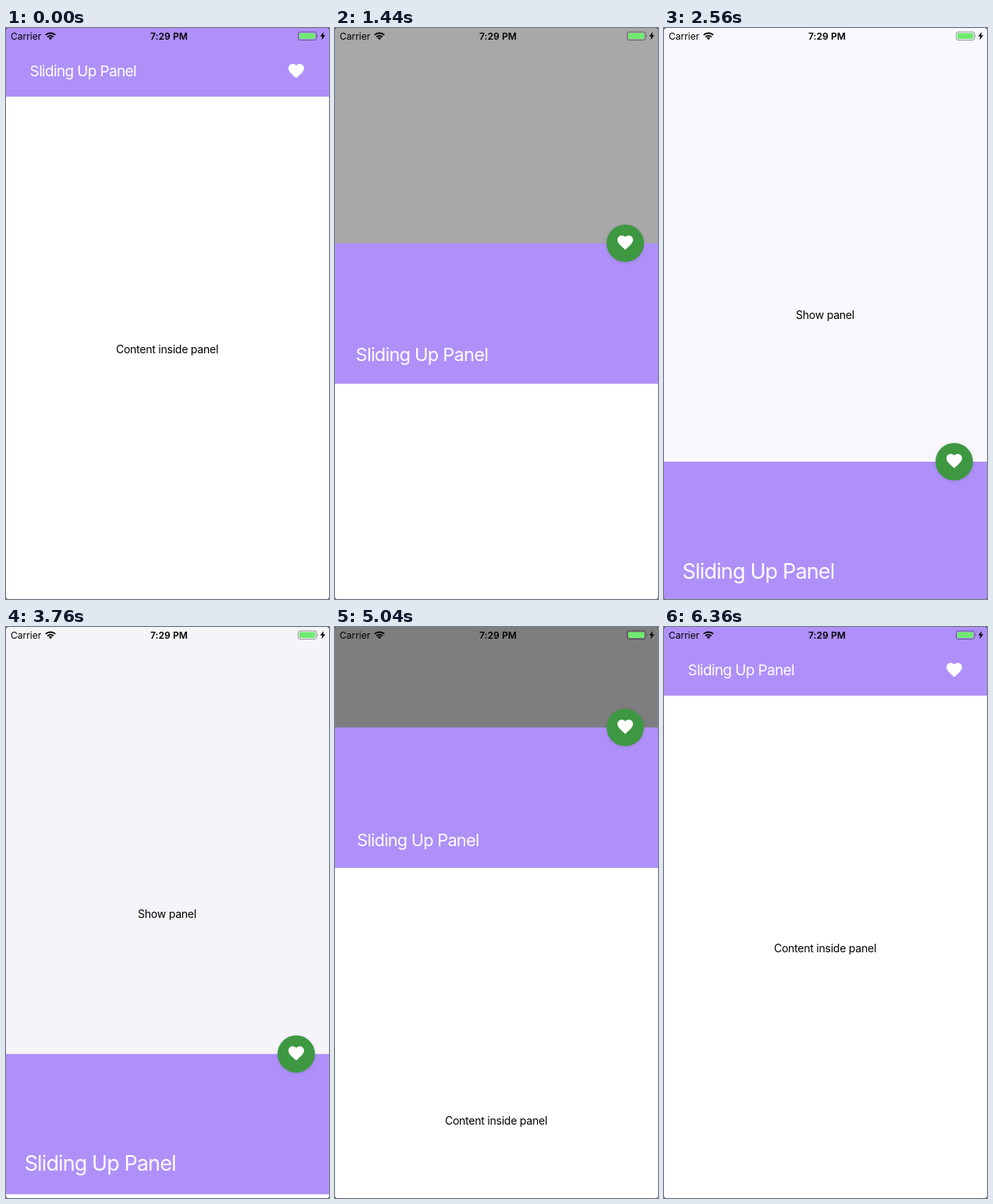
Animation of 414 by 732 pixels, one loop 6480 ms. Source, as an HTML page:

```html
<!DOCTYPE html>
<html lang="en">
<head>
<meta charset="utf-8">
<title>Sliding Up Panel</title>
<style>
  html, body { margin: 0; width: 100%; height: 100%; overflow: hidden; background: #222; }
  svg { display: block; width: 414px; height: 732px; border-radius: 3px; background: #f8f7fc; }
  text { font: 14px Inter, "Liberation Sans", sans-serif; letter-spacing: -.23px; }
  .mid { text-anchor: middle; }
  #title { font-size: 27px; letter-spacing: -.85px; fill: #fff; }
  #disc { filter: drop-shadow(0 1px 2px rgba(0, 0, 0, .12)); }
  #status text { font-size: 12px; letter-spacing: 0; }
  #status .clock { font-weight: 600; letter-spacing: .1px; }
</style>
</head>
<body>
<svg viewBox="0 0 414 732">
  <rect id="shade" width="414" height="732"/>
  <text class="mid" x="206.5" y="373">Show panel</text>

  <g id="panel">
    <rect width="414" height="180" fill="#af90f8"/>
    <rect y="180" width="414" height="732" fill="#fff"/>
    <text class="mid" x="206.5" y="509">Content inside panel</text>
    <text id="title">Sliding Up Panel</text>
  </g>

  <g id="icon">
    <circle id="disc" r="24" fill="#3e9842"/>
    <path transform="translate(-12 -13)" fill="#fff" d="M12 21.35l-1.45-1.32C5.4 15.36 2 12.28 2 8.5 2 5.42 4.42 3 7.5 3c1.74 0 3.41.81 4.5 2.09C13.09 3.81 14.76 3 16.5 3 19.58 3 22 5.42 22 8.5c0 3.78-3.4 6.86-8.55 11.54L12 21.35z"/>
  </g>

  <g id="status">
    <text x="6" y="15">Carrier</text>
    <g fill="none" stroke="#000" stroke-width="2">
      <path d="M50.8 8.9a9 9 0 0 1 12.4 0M53.2 11.5a5.6 5.6 0 0 1 7.6 0"/>
    </g>
    <path d="M57 15.2l-2.3-2.4a3.3 3.3 0 0 1 4.6 0z"/>
    <text class="mid clock" x="209" y="15">7:29 PM</text>
    <rect x="374.5" y="5" width="23.5" height="10.5" rx="2.5" fill="none" stroke="#000" stroke-opacity=".4"/>
    <rect x="376" y="6.5" width="20.5" height="7.5" rx="1" fill="#70ea70"/>
    <path d="M399 8.5q1.8 1.7 0 3.5z" fill-opacity=".4"/>
    <path d="M407.3 5l-4.6 5.8h2.8l-1.1 4.7 4.9-6.2h-2.9z"/>
  </g>
</svg>
<script>
const LOOP = 6480, STEP = 40, TOP = -92, REST = 556;

// [time, panel top] for each slide; speed is zero at both ends
const down = [[405, TOP], [1080, 114], [1440, 276], [2000, 490], [2440, REST]];
const up = [[3500, REST], [3760, 547.4], [4400, 385.5], [5040, 128.8], [5520, -19], [6130, TOP]];

const $ = id => document.getElementById(id);
const clamp = (v, lo, hi) => Math.min(hi, Math.max(lo, v));

function slope(keys, i) {
  if (i === 0 || i === keys.length - 1) return 0;
  const [[t0, y0], [t1, y1], [t2, y2]] = keys.slice(i - 1, i + 2);
  const a = t1 - t0, b = t2 - t1;
  return ((y1 - y0) / a * b + (y2 - y1) / b * a) / (a + b);
}

// Smooth cubic curve through the keys
function glide(keys, t) {
  t = clamp(t, keys[0][0], keys[keys.length - 1][0]);
  let i = 0;
  while (i < keys.length - 2 && t > keys[i + 1][0]) i++;
  const [[t0, y0], [t1, y1]] = keys.slice(i, i + 2);
  const d = t1 - t0, u = (t - t0) / d, v = 1 - u;
  return y0 * v * v * (1 + 2 * u) + y1 * u * u * (3 - 2 * u)
    + d * u * v * (slope(keys, i) * v - slope(keys, i + 1) * u);
}

function draw(t) {
  const y = glide(t < 3000 ? down : up, t);
  const p = (REST - y) / (REST - TOP);
  const scale = 1 - 0.3 * p;
  $('shade').setAttribute('opacity', 0.75 * p);
  $('panel').setAttribute('transform', `translate(0 ${y})`);
  $('title').setAttribute('transform',
    `translate(${23.6 + 7 * p} ${140 + 7 * p + 9.6 * scale}) scale(${scale})`);
  $('icon').setAttribute('transform', `translate(372 ${Math.max(y, 56)})`);
  $('disc').setAttribute('opacity', clamp(y / 48, 0, 1));
}

const start = performance.now();
function tick() {
  const t = (performance.now() - start) % LOOP;
  draw(Math.floor(t / STEP) * STEP);
  requestAnimationFrame(tick);
}
tick();
</script>
</body>
</html>
```
